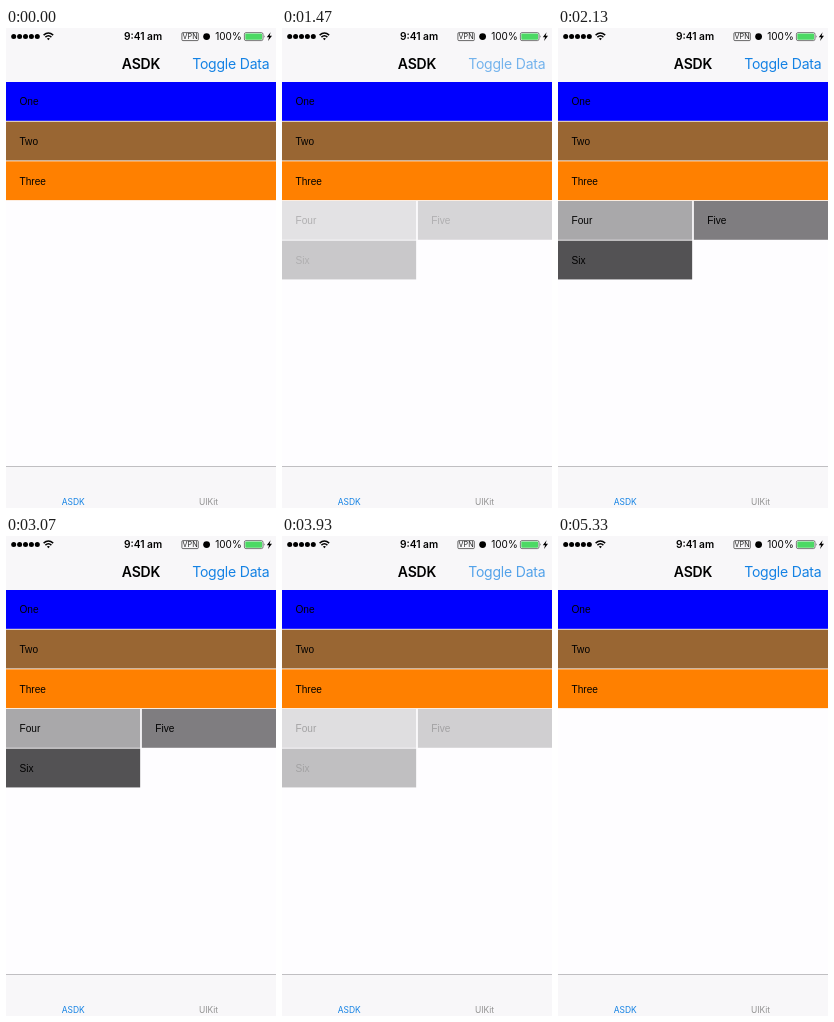
Recreate the animation shown at these times as an HTML page. Size 270 by 480 pixels, loop 5540 ms.

```html
<!DOCTYPE html>
<html lang="en">
<head>
<meta charset="utf-8">
<title>Toggle Data</title>
<style>
  html, body { margin: 0; width: 100%; height: 100%; overflow: hidden; background: #fefdff; }
  svg { display: block; width: 100vw; height: 100vh; font-family: Inter, sans-serif; }
  .mid { text-anchor: middle; }
  .nav { font-size: 14px; letter-spacing: -.2px; }
  .tab { font-size: 8.44px; }
  .cell { font: 10.125px "Liberation Sans", Arial, sans-serif; }
  .tint { fill: #1482e4; }
</style>
</head>
<body>
<svg viewBox="0 0 270 480">
  <rect width="270" height="480" fill="#fefdff"/>
  <rect width="270" height="54" fill="#f8f7f9"/>

  <g id="dots"></g>
  <g fill="none" stroke="#000" stroke-width="1.5">
    <path d="M37.6 7.1Q42.4 2.9 47.2 7.1M39.4 9.1Q42.4 6.5 45.4 9.1"/>
  </g>
  <path d="M40.9 10.5Q42.4 9.3 43.9 10.5L42.4 12.2Z"/>
  <text class="mid" x="137" y="12.3" font-size="10.2" font-weight="600">9:41 am</text>
  <rect x="175.9" y="4.6" width="16.4" height="8" rx="1" fill="none" stroke="#444" stroke-width=".8"/>
  <text class="mid" x="184.1" y="11.3" font-size="7.2" fill="#222">VPN</text>
  <circle cx="200.6" cy="8.6" r="3.4"/>
  <text class="mid" x="222.5" y="12.3" font-size="10">100%</text>
  <rect x="238.4" y="4.6" width="18.6" height="8" rx="1.6" fill="#fff" stroke="#444" stroke-width=".7"/>
  <rect x="239.3" y="5.5" width="16.8" height="6.2" rx=".9" fill="#4cd964"/>
  <path d="M257.9 7.1q1.3 1.5 0 3z" fill="#444"/>
  <path d="M264.6 4.2L260.8 9.2H263.1L262 13L266 7.8H263.6Z"/>

  <text class="mid nav" x="135" y="40.6" font-weight="600">ASDK</text>
  <text id="button" class="mid nav tint" x="224.8" y="40.6">Toggle Data</text>

  <g id="fixed"></g>
  <g id="extra"></g>

  <rect y="438.2" width="270" height="41.8" fill="#f8f7f9"/>
  <rect y="438" width="270" height=".8" fill="#b2b2b4"/>
  <text class="mid tab tint" x="67.2" y="477">ASDK</text>
  <text class="mid tab" x="202.5" y="477" fill="#929292">UIKit</text>
</svg>
<script>
const LOOP = 5540, FPS = 15, PT = 270 / 320;
const $ = id => document.getElementById(id);

function add(parent, tag, attrs, text = '') {
  const el = document.createElementNS('http://www.w3.org/2000/svg', tag);
  for (const key in attrs) el.setAttribute(key, attrs[key]);
  el.textContent = text;
  parent.append(el);
}

// Cell geometry is in points: rows of 46 with a gap of 1.
function cell(parent, label, fill, row, x = 0, width = 320) {
  const y = (64 + row * 47) * PT;
  add(parent, 'rect', { x: x * PT, y, width: width * PT, height: 46 * PT, fill });
  add(parent, 'text', { class: 'cell', x: x * PT + 13.5, y: y + 23.4 }, label);
}

for (let i = 0; i < 5; i++) add($('dots'), 'circle', { cx: 7.7 + i * 5.9, cy: 8.6, r: 2.5 });

cell($('fixed'), 'One', '#0000ff', 0);
cell($('fixed'), 'Two', '#996633', 1);
cell($('fixed'), 'Three', '#ff8000', 2);
cell($('extra'), 'Four', '#a9a8aa', 3, 0, 159);
cell($('extra'), 'Five', '#7f7d80', 3, 161, 159);
cell($('extra'), 'Six', '#535254', 4, 0, 159);

const progress = (t, start, length) => Math.min(1, Math.max(0, (t - start) / length));
const easeOut = p => 1 - (1 - p) ** 2;
const smooth = p => p * p * (3 - 2 * p);

const taps = [1260, 3725];
const releases = [1338, 3740];

function buttonAlpha(t) {
  const i = t < taps[1] ? 0 : 1;
  return t < taps[i] ? 1 : .2 + .8 * easeOut(progress(t, releases[i], 470));
}

const cellsAlpha = t => smooth(progress(t, 1356, 300)) - smooth(progress(t, 3754, 300));

function draw(now) {
  const t = Math.floor((now % LOOP + 4) * FPS / 1000) * 1000 / FPS;
  $('button').setAttribute('opacity', buttonAlpha(t));
  $('extra').setAttribute('opacity', cellsAlpha(t));
}

const begin = performance.now();
function tick() {
  draw(performance.now() - begin);
  requestAnimationFrame(tick);
}
tick();
</script>
</body>
</html>
```
